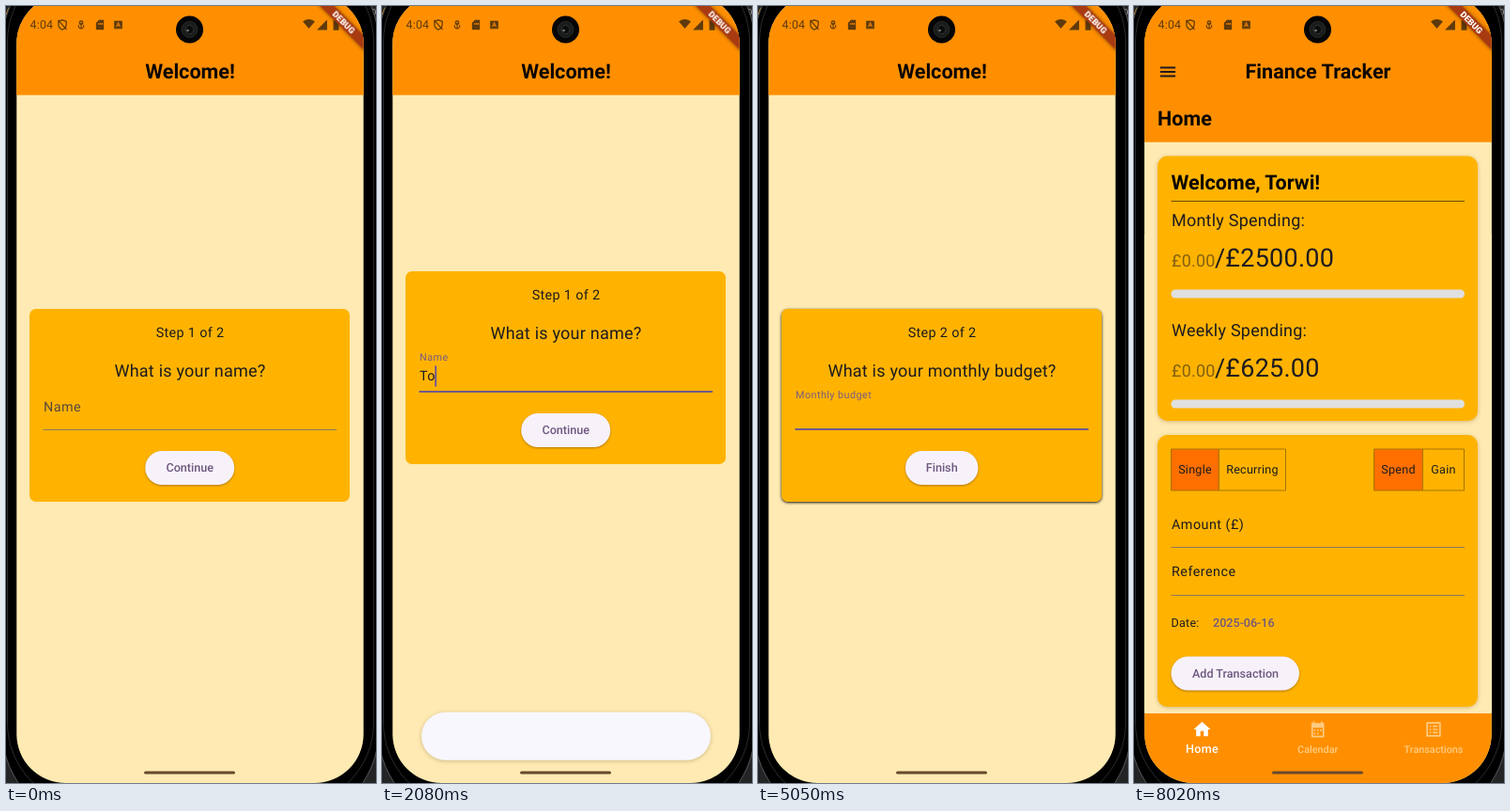
Write an HTML page that moves like this. It is 394 px wide and 826 px high and loops after 9.03 s.

```html
<!DOCTYPE html>
<html lang="en">
<head>
<meta charset="utf-8">
<title>Budget onboarding</title>
<style>
  html, body { margin: 0; width: 100%; height: 100%; overflow: hidden; background: #242426; }
  svg { display: block; width: 100%; height: 100%; font-family: Roboto, sans-serif; fill: #1d1b20; }
  text { white-space: pre; text-rendering: geometricPrecision; }
  .mid { text-anchor: middle; }
  .bold { font-weight: 700; fill: #0a0602; }
  .medium { font-weight: 500; }
  .body { letter-spacing: .23px; }
  .field { letter-spacing: .45px; }
  .purple { fill: #6750a4; }
  .mauve { fill: #6f5780; }
  .line { fill: none; stroke-linecap: round; stroke-linejoin: round; }
  .pill { fill: #f7f2fa; filter: drop-shadow(0 1px 1px rgba(80, 45, 0, .45)); }
  .card { fill: #ffb300; filter: drop-shadow(0 1px 2px rgba(120, 70, 0, .3)); }
  .deep { fill: #ffb300; filter: drop-shadow(0 1.5px 1.8px rgba(0, 0, 0, .95)); }
  .bar { fill: #f8f7fe; filter: drop-shadow(0 1px 2px rgba(90, 70, 30, .3)); }
</style>
</head>
<body>
<svg id="stage" viewBox="0 0 394 826"></svg>
<script>
const LOOP = 9030;
const NAME = 'Torwi';
const BUDGET = '2500';
const DIGIT_TIMES = [5230, 5430, 5700, 5830];
const ORANGE = '#ff8f00', CREAM = '#feeab2', REST_LINE = '#8f7656';

const text = (x, y, size, str, cls = '', attrs = '') =>
  `<text x="${x}" y="${y}" font-size="${size}" class="${cls}" ${attrs}>${str}</text>`;
const rect = (x, y, w, h, attrs = '') =>
  `<rect x="${x}" y="${y}" width="${w}" height="${h}" ${attrs}/>`;
const icon = (d, cx, cy, size, attrs = '') =>
  `<path d="${d}" fill-rule="evenodd" ${attrs}
    transform="translate(${cx - size / 2} ${cy - size / 2}) scale(${size / 24})"/>`;

const ICONS = {
  menu: 'M3 18h18v-2H3zM3 13h18v-2H3zM3 8h18V6H3z',
  home: 'M10 20v-6h4v6h5v-8h3L12 3 2 12h3v8z',
  mic: 'M12 14a3 3 0 0 0 3-3V5a3 3 0 0 0-6 0v6a3 3 0 0 0 3 3zM17 11a5 5 0 0 1-10 0H5a7 7 0 0 0 6 6.9V21h2v-3.1A7 7 0 0 0 19 11z',
  wifi: 'M12 21L.5 7.5a17 17 0 0 1 23 0z',
  signal: 'M2 22h20V2z',
  battery: 'M17 4h-3V2h-4v2H7v18h10z',
  sdCard: 'M20 2H10L4 8v14h16zM9 8h2v4H9zM12.5 8h2v4h-2zM16 8h2v4h-2z',
  letter: 'M3 3h18v18H3zM7 17h2l1-3h4l1 3h2L13 6h-2zM10.6 12h2.8L12 8.5z',
  shield: 'M12 2l8 3v6c0 5-3 9-8 11-5-2-8-6-8-11V5zM4 3l16 18',
  hand: 'M12 3a4 4 0 1 0 .1 0zM12 7v11M6 13c0 10 12 10 12 0',
  smile: 'M12 3a9 9 0 1 0 .1 0zM7.5 14c2 4.5 7 4.5 9 0zM8.5 9v1M15.5 9v1',
  check: 'M4 12.5l5 5L20 6.5',
  erase: 'M8 4h15v16H8L1.5 12zM11.5 8.5l7 7M18.5 8.5l-7 7',
  calendar: 'M4 4h16v18H4zM6 10v10h12V10zM6 2h2v2H6zM16 2h2v2h-2zM7 12h2v2H7zM11 12h2v2h-2zM15 12h2v2h-2zM7 16h2v2H7zM11 16h2v2h-2z',
  list: 'M3 3h18v18H3zM5 5v14h14V5z' + [7, 11, 15].map(y => `M7 ${y}h2v2H7zM11 ${y}h6v2h-6z`).join('')
};
const stroked = (name, x, y, size, color, width) =>
  icon(ICONS[name], x, y, size, `class="line" stroke="${color}" stroke-width="${width}"`);

// Coordinates are relative to the top of the card.
const formStep = (id, number, question, label, button, buttonWidth) => `
  <g id="${id}">
    ${text(196, 29.5, 14.4, `Step ${number} of 2`, 'mid', 'letter-spacing=".33"')}
    ${text(196, 71.5, 18, question, 'mid body')}
    ${text(40, 108.5, 14.4, label, 'field', 'data-part="label"')}
    ${rect(39.5, 128, 312.5, 1, 'data-part="underline"')}
    ${text(40, 116, 14.4, '', 'field', 'data-part="value"')}
    ${rect(0, 100.5, 1.8, 22, 'data-part="caret" class="purple"')}
    ${rect(195.7 - buttonWidth / 2, 151, buttonWidth, 36, 'rx="18" class="pill"')}
    ${text(195.7, 173.4, 12.6, button, 'mid medium mauve')}
  </g>`;

const spending = (y, title, amount) =>
  text(40, y, 18, title, 'body') +
  text(40, y + 43, 18, '£0.00', 'body', 'fill-opacity=".55"') +
  text(86, y + 43, 27, amount, 'body') +
  rect(39.5, y + 67.5, 312.5, 9, 'rx="4.5" fill="#e0e0e0"');

const toggle = (x, split, width, first, second) =>
  rect(x, 471, split, 44, 'fill="#ff6f00"') +
  `<path d="M${x} 471h${width}v44h${-width}zM${x + split} 471v44" fill="none" stroke="#a87400"/>` +
  text(x + split / 2, 497.3, 12.6, first, 'mid body') +
  text(x + (split + width) / 2, 497.3, 12.6, second, 'mid body');

const homePage = `
  <g id="home">
    ${rect(11, 0, 370, 826, `fill="${CREAM}"`)}
    ${rect(11, -30, 370, 174.7, `fill="${ORANGE}"`)}
    ${icon(ICONS.menu, 36, 70, 21.6)}
    ${text(196, 77, 21.6, 'Finance Tracker', 'mid bold')}
    ${text(25, 127, 21.6, 'Home', 'bold')}
    ${rect(25, 159.5, 341, 281.5, 'rx="10.8" class="card"')}
    ${text(39.5, 194.5, 21.6, `Welcome, ${NAME}!`, 'bold')}
    ${rect(39.5, 207, 312.5, 1, 'fill="#6b4b10"')}
    ${spending(234, 'Montly Spending:', '/£2500.00')}
    ${spending(351, 'Weekly Spending:', '/£625.00')}
    ${rect(25, 456, 341, 289, 'rx="10.8" class="card"')}
    ${toggle(39.5, 51, 122, 'Single', 'Recurring')}
    ${toggle(255.5, 52, 96, 'Spend', 'Gain')}
    ${text(40, 556, 14.4, 'Amount (£)', 'field')}
    ${rect(39.5, 575, 312.5, 1, `fill="${REST_LINE}"`)}
    ${text(40, 606, 14.4, 'Reference', 'field')}
    ${rect(39.5, 626, 312.5, 1, `fill="${REST_LINE}"`)}
    ${text(39.5, 660, 12.6, 'Date:', 'body')}
    ${text(84, 660, 12.6, '2025-06-16', 'medium mauve')}
    ${rect(39.5, 691.5, 136.5, 36, 'rx="18" class="pill"')}
    ${text(108, 714, 12.6, 'Add Transaction', 'mid medium mauve')}
    ${rect(11, 752, 370, 74, `fill="${ORANGE}"`)}
    <g fill="#fff">
      ${icon(ICONS.home, 72.5, 769, 21.6)}
      ${text(72.5, 794, 12.6, 'Home', 'mid medium body')}
    </g>
    <g fill="#ffcb82">
      ${icon(ICONS.calendar, 195.7, 769, 20.5)}
      ${text(195.7, 794, 10.8, 'Calendar', 'mid medium')}
      ${icon(ICONS.list, 319, 769, 20.5)}
      ${text(319, 794, 10.8, 'Transactions', 'mid medium')}
    </g>
  </g>`;

const formPage = `
  <g id="form">
    ${rect(11, 0, 370, 826, `fill="${CREAM}"`)}
    ${rect(11, -30, 370, 124.7, `fill="${ORANGE}"`)}
    ${text(196, 77, 21.6, 'Welcome!', 'mid bold')}
    <g id="card">
      ${rect(25, 0, 341, 205, 'rx="7" class="deep" id="shadow"')}
      ${rect(25, 0, 341, 205, 'rx="7" fill="#ffb300"')}
      ${formStep('step1', 1, 'What is your name?', 'Name', 'Continue', 95)}
      ${formStep('step2', 2, 'What is your monthly budget?', 'Monthly budget', 'Finish', 77.5)}
    </g>
  </g>`;

const INK = '#1c1b22';
const toolbar = `
  <g id="toolbar">
    <rect id="bar" height="51" rx="25.5" class="bar"/>
    <g id="tools">
      <circle cx="195.5" cy="774.5" r="20" fill="#d9e2ff"/>
      ${icon(ICONS.menu, 102.5, 774.5, 22)}
      ${stroked('smile', 149, 774.5, 22, INK, 2)}
      ${stroked('check', 195.5, 774.5, 22, '#3c4463', 2)}
      ${stroked('erase', 242, 774.5, 23, INK, 2)}
      ${icon(ICONS.mic, 289, 774.5, 21)}
    </g>
    <g id="suggestions">
      ${icon(ICONS.menu, 42.5, 777.5, 22)}
      ${rect(67.8, 769, 1.2, 16.5, 'fill="#c5c6d0"')}
      ${text(110.5, 783, 16, NAME, 'mid')}
      ${text(196, 783, 14.3, NAME + 'ton', 'mid')}
      ${text(281.5, 783, 14.3, NAME + 'ville', 'mid')}
      ${rect(323.8, 769, 1.2, 16.5, 'fill="#c5c6d0"')}
      ${icon(ICONS.mic, 348, 777.5, 21)}
    </g>
  </g>`;

const STATUS = '#5f3a0c';
const overlay = `
  <g fill="${STATUS}">
    ${text(25.5, 24, 12.4, '4:04', 'body')}
    ${stroked('shield', 60, 20, 12.5, STATUS, 2.4)}
    ${stroked('hand', 80, 20, 11, STATUS, 2.4)}
    ${icon(ICONS.sdCard, 100, 20, 12.5)}
    ${icon(ICONS.letter, 119.5, 20, 11.5)}
    ${icon(ICONS.wifi, 322.5, 19, 13.5)}
    ${icon(ICONS.signal, 336.5, 20, 13)}
    ${icon(ICONS.battery, 351.5, 20, 14)}
  </g>
  <circle cx="195.5" cy="25" r="14.5" fill="#050505"/>
  <circle cx="195.5" cy="25" r="8.5" fill="#191c1b" stroke="#262927"/>
  <circle cx="195.5" cy="25" r="4.5" fill="#0b0d0d" stroke="#313532"/>
  <circle cx="193.5" cy="26" r="1.3" fill="#777b76"/>
  <g transform="translate(359.5 17.5) rotate(45)">
    ${rect(-60, -5.4, 120, 10.8, 'fill="#a83a12" style="filter:drop-shadow(0 0 2px rgba(0,0,0,.45))"')}
    ${text(0, 3.3, 9.2, 'DEBUG', 'mid', 'font-weight="900" fill="#fff"')}
  </g>
  ${rect(147, 813.4, 97, 3.2, 'rx="1.6" fill="#69492f"')}`;

const $ = id => document.getElementById(id);
$('stage').innerHTML = `
  <clipPath id="screen">${rect(11.3, -12, 369.4, 838, 'rx="52"')}</clipPath>
  ${text(-1, 10, 11, '/', '', 'fill="#e89a20"')}
  ${text(388, 10, 10, 'D', '', 'fill="#9a9a9a"')}
  ${rect(-4, -60, 401, 930, 'rx="100" fill="#000" stroke="#55555a"')}
  ${rect(1.5, -50, 390, 900, 'rx="88" fill="#000" stroke="#2c2c2e"')}
  <g clip-path="url(#screen)">${formPage}${toolbar}${homePage}${overlay}</g>`;

const clamp = v => Math.min(1, Math.max(0, v));
const mix = (a, b, p) => a + (b - a) * p;
const between = (t, ...spans) => spans.some(([a, b]) => t >= a && t < b);
// Progress from 0 to 1 in `count` equal jumps, the first at `start`, the last at `end`.
const staged = (t, start, end, count) =>
  t < start ? 0 : clamp((1 + Math.floor((t - start) * (count - 1) / (end - start))) / count);
const set = (el, attrs) => {
  for (const key in attrs) el.setAttribute(key, attrs[key]);
};

const parts = id => Object.fromEntries(
  [...$(id).querySelectorAll('[data-part]')].map(el => [el.dataset.part, el]));
const fields = { step1: parts('step1'), step2: parts('step2') };

function drawField(id, opacity, focus, value, caretOn) {
  const { label, underline, value: input, caret } = fields[id];
  const raised = value ? 1 : focus;
  set($(id), { opacity });
  set(label, {
    y: mix(108.5, 95, raised),
    'font-size': mix(14.4, 10.8, raised),
    fill: focus > .4 ? '#7b5c80' : '#57493d'
  });
  set(underline, {
    y: mix(128, 127, focus),
    height: mix(1, 2, focus),
    fill: focus > .4 ? '#73588c' : REST_LINE
  });
  input.textContent = value;
  set(caret, {
    x: 39.3 + (value ? input.getComputedTextLength() : 0),
    opacity: caretOn ? 1 : 0
  });
}

function draw(t) {
  const lift = clamp(2 * staged(t, 1200, 1540, 6));
  const drop = staged(t, 4560, 4750, 4);
  const swap = staged(t, 3700, 3820, 3);
  const widen = staged(t, 1940, 2215, 5);
  const enter = staged(t, 7540, 8020, 8);
  const ease = 1 - (1 - enter) ** 4;

  set($('card'), { transform: `translate(0 ${322 - 40 * lift + 40 * drop})` });
  set($('shadow'), { opacity: swap });

  const letters = t < 1940 ? 0 : 1 + Math.floor((t - 1940) / 137.5);
  drawField('step1', 1 - swap, staged(t, 850, 1060, 4), NAME.slice(0, letters),
    between(t, [920, 1330], [1940, 3020], [3480, 3820]));
  const digits = DIGIT_TIMES.filter(time => time <= t).length;
  drawField('step2', swap, drop, BUDGET.slice(0, digits),
    between(t, [4680, 5050], [5230, 6290], [6750, 7280]));

  set($('toolbar'), {
    opacity: lift * (1 - drop),
    transform: `translate(0 ${14 * (1 - lift) + 10 * drop})`
  });
  set($('bar'), { x: mix(78, 18, widen), y: mix(749, 752, widen), width: mix(236, 356, widen) });
  set($('tools'), { opacity: clamp(1 - 2 * widen) });
  set($('suggestions'), { opacity: clamp(3 * widen - 2) });

  const zoom = s => `translate(196 413) scale(${s}) translate(-196 -413)`;
  set($('form'), { transform: zoom(1 + .05 * ease) });
  set($('home'), { transform: zoom(.85 + .15 * ease), opacity: clamp(4 * enter) });
}

const begin = performance.now();
function tick() {
  draw((performance.now() - begin) % LOOP);
  requestAnimationFrame(tick);
}
tick();
</script>
</body>
</html>
```
